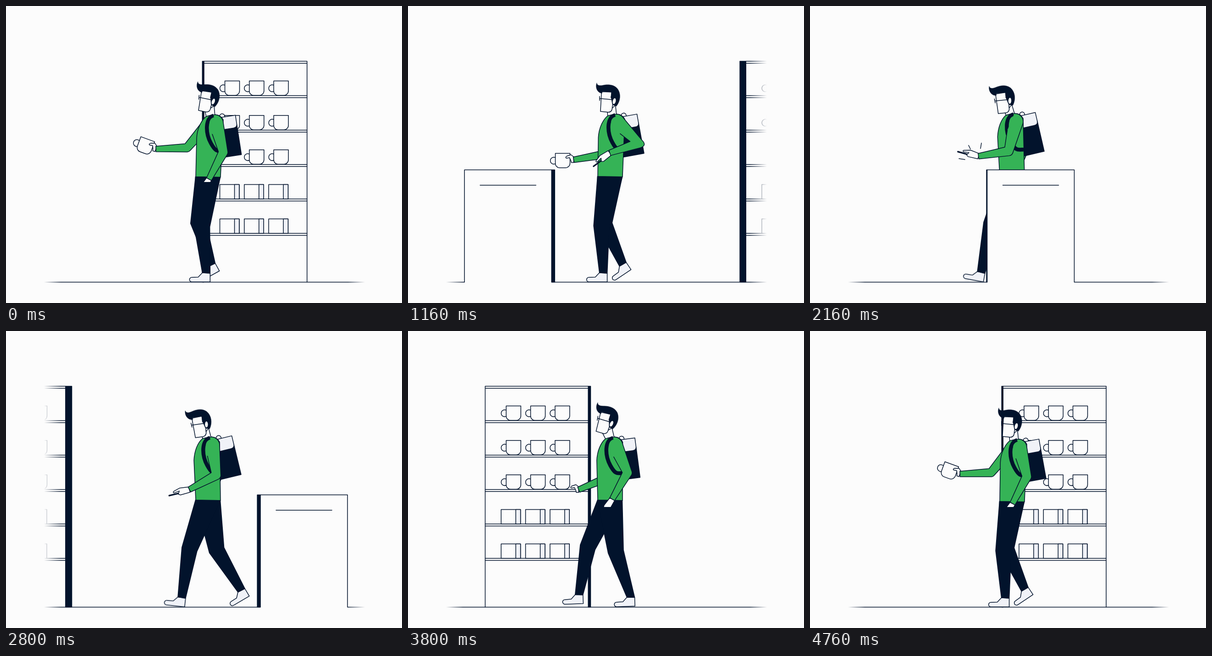
An HTML page for the animation above (4800 ms loop, 864 by 648 pixels).

```html
<!DOCTYPE html>
<html lang="en">
<head>
<meta charset="utf-8">
<title>Grab and go</title>
<style>
html, body { margin: 0; width: 100%; height: 100%; overflow: hidden; background: #fcfcfc; }
svg { display: block; width: 100vw; height: 100vh; }
</style>
</head>
<body>
<svg id="stage" viewBox="0 0 864 648">
  <defs>
    <linearGradient id="fade" gradientUnits="userSpaceOnUse" x1="83" x2="783" y1="0" y2="0">
      <stop offset="0" stop-color="#000"/>
      <stop offset=".053" stop-color="#fff"/>
      <stop offset=".947" stop-color="#fff"/>
      <stop offset="1" stop-color="#000"/>
    </linearGradient>
    <mask id="edges" maskUnits="userSpaceOnUse" x="0" y="0" width="864" height="648">
      <rect x="83" width="700" height="648" fill="url(#fade)"/>
    </mask>
    <clipPath id="pocket"><rect width="864" height="384"/></clipPath>
  </defs>
</svg>
<script>
const LOOP = 4800, STEP = 600, SPAN = 1264, SPEED = SPAN / LOOP;
const GRAB = 1500, PICK = 4100;
const NAVY = '#02132c', GREEN = '#35b356', PAPER = '#fcfcfc', PALE = '#f0f2f8';
const stage = document.getElementById('stage');

function el(tag, attrs, parent) {
  const node = document.createElementNS('http://www.w3.org/2000/svg', tag);
  set(node, attrs);
  parent.appendChild(node);
  return node;
}
function set(node, attrs) { for (const k in attrs) node.setAttribute(k, attrs[k]); }
const group = (parent, attrs = {}) => el('g', attrs, parent);
const shape = (parent, fill, d = '') => el('path', { fill, d }, parent);
const show = (node, on) => set(node, { visibility: on ? 'visible' : 'hidden' });
const place = (p, deg = 0) => `translate(${p}) rotate(${deg})`;
const poly = pts => 'M' + pts.join('L') + 'Z';

const { sin, cos, PI, sqrt, hypot } = Math;
const mod = (a, b) => ((a % b) + b) % b;
const clamp = (x, lo = 0, hi = 1) => Math.min(hi, Math.max(lo, x));
const mix = (a, b, k) => a + (b - a) * k;
const smooth = x => x * x * (3 - 2 * x);
const smoother = x => x * x * x * (x * (6 * x - 15) + 10);
const add = (p, d, k = 1) => [p[0] + d[0] * k, p[1] + d[1] * k];
const right = d => [d[1], -d[0]];
function unit(a, b) {
  const l = hypot(b[0] - a[0], b[1] - a[1]);
  return [(b[0] - a[0]) / l, (b[1] - a[1]) / l];
}
function turn([x, y], deg) {
  const c = cos(deg * PI / 180), s = sin(deg * PI / 180);
  return [x * c - y * s, x * s + y * c];
}

// Arm gestures: start time, then the values of the pose
const nearPoses = [ // upper arm, forearm and hand angles
  [0, 75, 118, 118], [560, 63, 125, 130], [1160, 44, 162, 141], [2160, 103, 170.5, 193],
  [2350, 103, 170.5, 193], [3360, 52, 126, 124], [4200, 77, 115, 115]
];
const farPoses = [ // wrist x, y and hand angle
  [0, 327, 312, 20], [560, 342, 322, 4], [1160, 361.5, 335.5, 0], [1450, 374, 374, 0],
  [2160, 442, 379, 0], [3360, 442, 379, 0], [PICK, 333.5, 328, 0], [4280, 336, 316.5, 13]
];
function poseAt(poses, t) {
  const i = poses.findLastIndex(p => p[0] <= t);
  const from = poses[i], to = poses[(i + 1) % poses.length];
  const k = smooth((t - from[0]) / ((to[0] || LOOP) - from[0]));
  return from.slice(1).map((v, c) => mix(v, to[c + 1], k));
}

const CUP = 'M0 9.3A7.5 7.5 0 1 0 0 22.7M0 0H32V21.5a10 10 0 0 1-10 10H9.5A9.5 9.5 0 0 1 0 21.5Z';
const FOOT = 'M0 0V-19L-17-20L-26-10.5L-40-10A5 5 0 0 0-40 0Z';

const art = group(stage, { stroke: NAVY, 'stroke-width': 1.5, 'stroke-linejoin': 'round', 'stroke-linecap': 'round' });

// Shelf and ground
const back = group(art, { mask: 'url(#edges)' });
const ground = shape(back, 'none');
const shelf = group(back);
const pillar = el('rect', { y: 120.5, height: 482, fill: NAVY }, shelf);
shape(shelf, 'none', 'M0 602.5V120.5H225V602.5M0 125H225');
const cups = [];
for (let r = 0; r < 5; r++) {
  const y = 195.5 + r * 75.15;
  shape(shelf, 'none', `M0 ${y}H225M0 ${y + 4.5}H225`);
  for (let c = 0; c < 3; c++) {
    const x = 34.8 + c * 53.3;
    if (r < 3) {
      const cup = shape(shelf, PAPER, CUP);
      set(cup, { transform: place([x + 11, y - 32]) });
      cups.push(cup);
    } else {
      shape(shelf, PAPER, `M${x} ${y - 31.5}h42.3v31.5h-42.3z`);
      shape(shelf, PALE, `M${x + 32} ${y - 31.5}h10.3v31.5h-10.3z`);
    }
  }
}
const takenCup = cups[6];

// Person, back to front
const man = group(art);
const farHand = group(man);
const heldCup = shape(farHand, PAPER, CUP);
set(heldCup, { transform: place([-40, -14]) });
shape(farHand, PAPER, 'M0-6.5L-6-11L-15-8Q-19-5-16-3.5L-9-4.5L-6 2L-5 6H0Z');
const farSleeve = shape(man, GREEN);

const bag = group(man);
el('circle', { cx: -29, cy: -2, r: 5.5, fill: PAPER }, bag);
shape(bag, NAVY, 'M-46 10H-2L0 20V87H-46Z');
shape(bag, PALE, 'M-46 0H0V19Q0 27-8 27H-46Z');

const legs = [0, 1].map(() => ({ foot: shape(man, PALE, FOOT), cloth: shape(man, NAVY) }));

const neck = shape(man, PAPER);
const torso = shape(man, GREEN);
const shoulder = group(man);
set(shape(shoulder, 'none', 'M-4-16C-23-11-22 22-10 44S6 60 18 61'), { 'stroke-width': 8.5, 'stroke-linecap': 'butt' });
el('circle', { r: 13, fill: GREEN, stroke: 'none' }, shoulder);

const head = group(man);
shape(head, PAPER, 'M3-43L0 0L17 2C24 2 26-4 26-10L27-14L24-30L25-42Z');
const hair = shape(head, NAVY, 'M-7-62C-10-56-9-42 4-39.5L5-44L25-41.5L23-30C26-27 27-22 27-14L35-11C44-22 46-38 38-49C30-59 16-59 6-57C0-56-6-56-7-62Z');
set(hair, { 'stroke-width': .5 });
el('ellipse', { cx: 30.5, cy: -22, rx: 3.2, ry: 6.5, fill: PAPER, stroke: 'none', transform: 'rotate(14 30.5 -22)' }, head);
shape(head, 'none', 'M-1.5-33V-24M-1.5-28.5L25-25.5');

const nearHand = group(group(man, { 'clip-path': 'url(#pocket)' }));
set(shape(nearHand, 'none', 'M14-2L46-.5'), { 'stroke-width': 3.2 });
shape(nearHand, PAPER, 'M0 6L20 9L34 5.6Q37 3.5 34 2L22 3L26-3L22-6L0-6Z');
const nearSleeve = shape(man, GREEN);

const taps = [[[350, 312], [346, 304]], [[372, 311], [374, 299]], [[338, 335], [325, 333]]]
  .map(([from, to]) => ({ from, to, line: shape(man, 'none') }));

// Counter
const counter = group(group(art, { mask: 'url(#edges)' }));
const slab = el('rect', { y: 357.5, height: 245, fill: NAVY }, counter);
set(shape(counter, PAPER, 'M0 357.5H190V604H0Z'), { stroke: 'none' });
shape(counter, 'none', 'M0 602.5V357.5H190V602.5M34 391H156');

// Side face seen in perspective, on the edge nearer the middle
function sideFace(rect, x, width, mid) {
  const d = (x - mid) * .032;
  set(rect, { x: d > 0 ? -d : width, width: Math.abs(d) });
}

function drawScene(t) {
  const wrap = x => mod(x + 400, SPAN) - 400;
  const sx = wrap(431.5 + SPEED * t), cx = wrap(-182.5 + SPEED * t);
  set(shelf, { transform: place([sx, 0]) });
  sideFace(pillar, sx, 225, 326);
  show(takenCup, t > GRAB && t < PICK);
  set(counter, { transform: place([cx, 0]) });
  sideFace(slab, cx, 190, 341);
  set(ground, { d: `M83 602.5H${clamp(cx, 83, 783)}M${clamp(cx + 190, 83, 783)} 602.5H783` });
}

// Heel position, foot angle and knee bend while the foot is on the ground
function planted(s) {
  const land = clamp(1 - s * 6), roll = clamp((s - .6) / .4) ** 2;
  return {
    heel: [378 + 153.5 * s + 6 * sin(PI * s), 602 - 15 * roll],
    deg: 10.5 * land - 18 * roll,
    bend: 11
  };
}

// The same while it swings forward; the lift comes early
function swinging(s) {
  const lift = sin(PI * sqrt(s)) ** 2;
  return {
    heel: [mix(531.5, 378, smoother(clamp(1.15 * s))), 602 - 15 * (1 - s) - 18 * lift],
    deg: mix(-18, 10.5, s) - 27 * lift,
    bend: 11 + 17 * lift
  };
}

function drawLeg(leg, { heel, deg, bend }, hem) {
  const ankleBack = add(heel, turn([0, -19], deg)), ankleFront = add(heel, turn([-17, -20], deg));
  const hip = [440.5, hem], ankle = add(ankleFront, add(ankleBack, ankleFront, -1), .5);
  const across = right(unit(hip, ankle));
  const knee = add(add(hip, add(ankle, hip, -1), .52), across, -bend);
  set(leg.foot, { transform: place(heel, deg) });
  set(leg.cloth, {
    d: poly([[413.5, hem], add(knee, across, -17), ankleFront, ankleBack, add(knee, across, 17), [467.5, hem + 1]])
  });
}

// Tapered sleeve through shoulder s, elbow e and wrist w with three half widths
function sleeve(s, e, w, [r0, r1, r2], start) {
  const u = unit(s, e), n = right(u), m = right(unit(e, w));
  const k = r1 / Math.max(.4, 1 + n[0] * m[0] + n[1] * m[1]);
  const corner = add(n, m);
  return `M${add(add(s, u, start), n, -.76 * r0)}L${add(e, corner, -k)}L${add(w, m, -r2)}L${add(w, m, r2)}`
    + `L${add(e, m, r1)}Q${add(e, corner, k)} ${add(e, n, r1)}L${add(s, n, r0)}`
    + `A${r0 + 1} ${r0 + 1} 0 0 0 ${add(s, [-2, -r0 - 1])}`;
}

// Elbow of an arm with the given bone lengths, bent backwards
function elbowOf(s, w, a, b) {
  const d = hypot(w[0] - s[0], w[1] - s[1]), u = unit(s, w);
  const along = (a * a - b * b + d * d) / (2 * d);
  return add(add(s, u, along), right(u), sqrt(Math.max(0, a * a - along * along)));
}

function drawBody(s, sway, tilt, hem) {
  const [x, y] = s;
  set(bag, { transform: place([x + 43.5, y - 18 + .18 * tilt], -10 + .25 * tilt) });
  set(shoulder, { transform: place(s) });

  const nape = [452 + 1.6 * sway, y - 39.5];
  const chin = add(nape, turn([-34, 15], tilt));
  set(head, { transform: place(chin, tilt) });
  const jaw = add(chin, turn([15, 2], tilt)), ear = add(chin, turn([33, -13], tilt));
  set(neck, { d: poly([jaw, [x - 20, y - 13], [x - 1, y - 15], ear]) });

  const chest = 414.5 + .75 * sway;
  set(torso, {
    d: `M${x - 21} ${y - 14}C${x - 31} ${y - 5} ${chest + 1} ${y + 12} ${chest} ${y + 33}`
      + `L414 ${hem}L468 ${hem + 1}L${x + 17} ${y - 7}Q${x + 11} ${y - 18} ${x} ${y - 18}`
      + `Q${x - 12} ${y - 17.5} ${x - 21} ${y - 14}Z`
  });
}

function drawArms(s, t) {
  const [upper, fore, hand] = poseAt(nearPoses, t);
  const elbow = add(s, turn([66, 0], upper)), wrist = add(elbow, turn([66.5, 0], fore));
  set(nearSleeve, { d: sleeve(s, elbow, wrist, [17, 10, 6], 22) });
  set(nearHand, { transform: place(wrist, hand) });

  const [x, y, deg] = poseAt(farPoses, t);
  const root = add(s, [-15, -3]);
  set(farSleeve, { d: sleeve(root, elbowOf(root, [x, y], 74, 68), [x, y], [14, 9, 6], 6) });
  set(farHand, { transform: place([x, y], deg) });
  show(heldCup, t <= GRAB || t >= PICK);
}

// Each dash grows outward, then its tail catches up.
function drawTaps(t) {
  const tip = clamp((t - 2080) / 80), tail = clamp((t - 2170) / 90);
  for (const { from, to, line } of taps) {
    const way = add(to, from, -1);
    show(line, tip > tail);
    set(line, { d: `M${add(from, way, tail)}L${add(from, way, tip)}` });
  }
}

function draw(t) {
  const a = 2 * PI * t / STEP, bob = cos(2 * a);
  const sway = 4.7 * cos(a - .31) - 2.5;
  const tilt = .2 + 4.8 * cos(a) + 14 * sin(a);
  const s = [455 + sway, 251.3 + 4 * bob], hem = 370 + 2.5 * bob;
  const stride = mod(t - 360, STEP) / STEP;

  drawScene(t);
  drawLeg(legs[0], swinging(stride), hem);
  drawLeg(legs[1], planted(stride), hem);
  drawBody(s, sway, tilt, hem);
  drawArms(s, t);
  drawTaps(t);
}

const begin = performance.now();
function tick() {
  draw(mod(performance.now() - begin, LOOP));
  requestAnimationFrame(tick);
}
tick();
</script>
</body>
</html>
```
